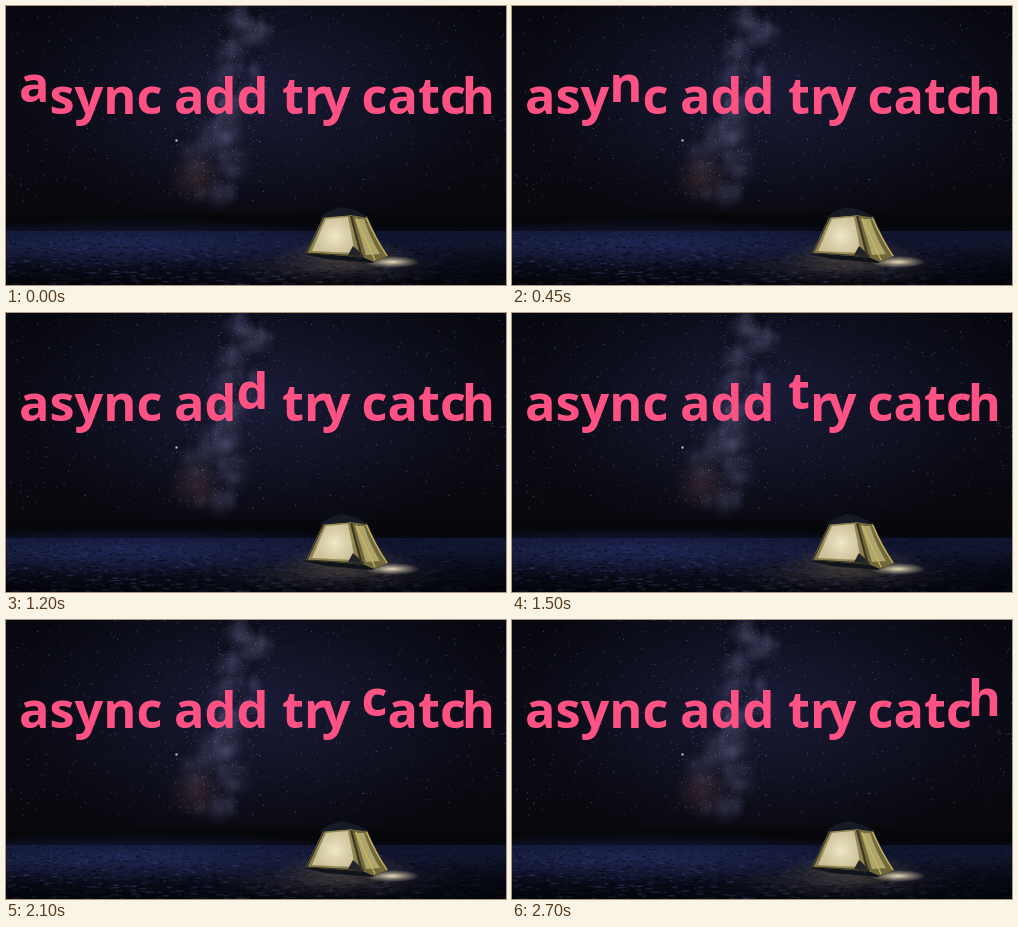
Write an HTML page with a canvas that moves like this. It is 500 px wide and 279 px high and loops after 2.85 s.

```html
<!DOCTYPE html>
<html lang="en">
<head>
<meta charset="utf-8">
<style>
html, body { margin: 0; height: 100%; overflow: hidden; background: #06070e; }
canvas { display: block; width: 100vw; height: 100vh; }
</style>
</head>
<body>
<canvas id="stage" width="500" height="279"></canvas>
<script>
const W = 500, H = 279, HORIZON = 206, SHORE = 225;
const STEP = 150, LIFT = 12, BASE = 108;
const WORDS = { async: 13, add: 168, try: 276, catch: 355.5 };
const KERN = { ry: -5, ch: -4 };
const TEXT = Object.keys(WORDS).join(' ');
const ctx = stage.getContext('2d');
const night = document.createElement('canvas');
night.width = W;
night.height = H;
const g = night.getContext('2d');

let seed = 11;
const rand = () => (seed = seed * 16807 % 2147483647) / 2147483647;
const spread = () => rand() + rand() + rand() - 1.5;
const repeat = (n, draw) => { for (let i = 0; i < n; i++) draw(i / n); };

function band(y, h, ...colors) {
  const fill = g.createLinearGradient(0, y, 0, y + h);
  colors.forEach((color, i) => fill.addColorStop(i / (colors.length - 1), color));
  g.fillStyle = fill;
  g.fillRect(0, y, W, h);
}
function glow(x, y, rx, ry, rgb, alpha) {
  const fill = g.createRadialGradient(0, 0, 0, 0, 0, 1);
  fill.addColorStop(0, `rgba(${rgb},${alpha})`);
  fill.addColorStop(0.5, `rgba(${rgb},${alpha * 0.45})`);
  fill.addColorStop(1, `rgba(${rgb},0)`);
  g.save();
  g.translate(x, y);
  g.scale(rx, ry);
  g.fillStyle = fill;
  g.fillRect(-1, -1, 2, 2);
  g.restore();
}
function dot(x, y, w, h, rgb, alpha) {
  g.fillStyle = `rgba(${rgb},${alpha})`;
  g.fillRect(x, y, w, h);
}
function shape(path, color) {
  g.fillStyle = color;
  g.fill(new Path2D(path));
}
function line(path, color, width) {
  g.strokeStyle = color;
  g.lineWidth = width;
  g.stroke(new Path2D(path));
}

const galaxy = y => 243 - y * 0.23;

function drawSky() {
  band(0, HORIZON, '#07080f', '#090a13', '#0a0a13', '#08080e');
  glow(255, 85, 250, 145, '36,38,78', 0.6);
  repeat(90, t => {
    const y = t * 192, dark = rand() < 0.4;
    glow(galaxy(y) + spread() * 30, y, 6 + rand() * 14, 6 + rand() * 14,
      dark ? '8,9,20' : '110,108,150', dark ? 0.3 : 0.2);
  });
  glow(190, 172, 28, 28, '130,85,85', 0.3);
  repeat(1300, () => dot(rand() * W, rand() * 195, 0.8, 0.8, '150,158,215', rand() ** 2 * 0.75));
  repeat(500, t => dot(galaxy(t * 190) + spread() * 45, t * 190, 0.8, 0.8, '190,185,215', rand() * 0.5));
  dot(169.5, 133.5, 2, 2, '225,228,245', 0.9);
}

function drawGround() {
  band(HORIZON, SHORE - HORIZON, '#08080d', '#05060a', '#070811');
  band(SHORE, H - SHORE, '#101530', '#11152c', '#0b0d1c', '#05060c');
  glow(130, 238, 260, 26, '44,54,118', 0.5);
  glow(330, 262, 120, 18, '70,62,62', 0.5);
  repeat(1800, t => {
    const near = t, x = rand() * W, y = SHORE + t * (H - SHORE);
    const light = rand() < 0.5;
    dot(x, y, 2 + rand() * 9 * near, 0.7 + near * 0.8,
      light ? '82,92,150' : '2,3,10', light ? rand() * 0.4 * (1 - x / 800) : 0.4);
  });
  glow(500, 270, 130, 36, '3,4,9', 0.7);
  glow(0, 279, 160, 26, '3,4,9', 0.6);
}

function drawTent() {
  glow(340, 250, 70, 18, '150,135,95', 0.35);
  glow(386, 256, 28, 6, '255,240,200', 0.9);
  shape('M297 248L320 244L380 251L366 257L320 253Z', '#11131a');
  shape('M317 211L346 209L354 251L300 247Z', '#8d8250');
  shape('M346 209L361 210Q370 232 382 250L368 256L354 250Z', '#71683c');
  shape('M320 213L342 211L349 247L306 245Z', '#cdc29a');
  glow(329, 230, 20, 20, '255,248,220', 0.7);
  shape('M349 213L358 213Q364 232 374 248L360 249Z', '#b0a56c');
  shape('M342 249L347 240L358 250L354 253Z', '#22242b');
  line('M318 211L301 247L354 250', '#35321f', 1.2);
  line('M345 210Q350 230 356 251', '#3a3420', 2);
  line('M350 212L369 254M360 211Q369 232 381 250', '#cbb95f', 1.2);
  shape('M313 212Q324 203 336 201Q350 203 363 212L345 209Z', '#151a24');
}

// Natural advances inside each word, with two tightened pairs.
function layout() {
  return Object.entries(WORDS).flatMap(([word, left]) => {
    let x = left;
    return [...word].map((char, i) => {
      x += KERN[word[i - 1] + char] || 0;
      const letter = { char, x, index: TEXT.indexOf(word) + i };
      x += ctx.measureText(char).width;
      return letter;
    });
  });
}

drawSky();
drawGround();
drawTent();
ctx.font = '700 50.5px "Open Sans", "Noto Sans", sans-serif';
const letters = layout();

function frame(now) {
  const active = Math.floor(now / STEP) % TEXT.length;
  ctx.drawImage(night, 0, 0);
  ctx.fillStyle = '#ff5284';
  for (const { char, x, index } of letters) {
    ctx.fillText(char, x, BASE - (index === active ? LIFT : 0));
  }
  requestAnimationFrame(frame);
}
requestAnimationFrame(frame);
</script>
</body>
</html>
```
